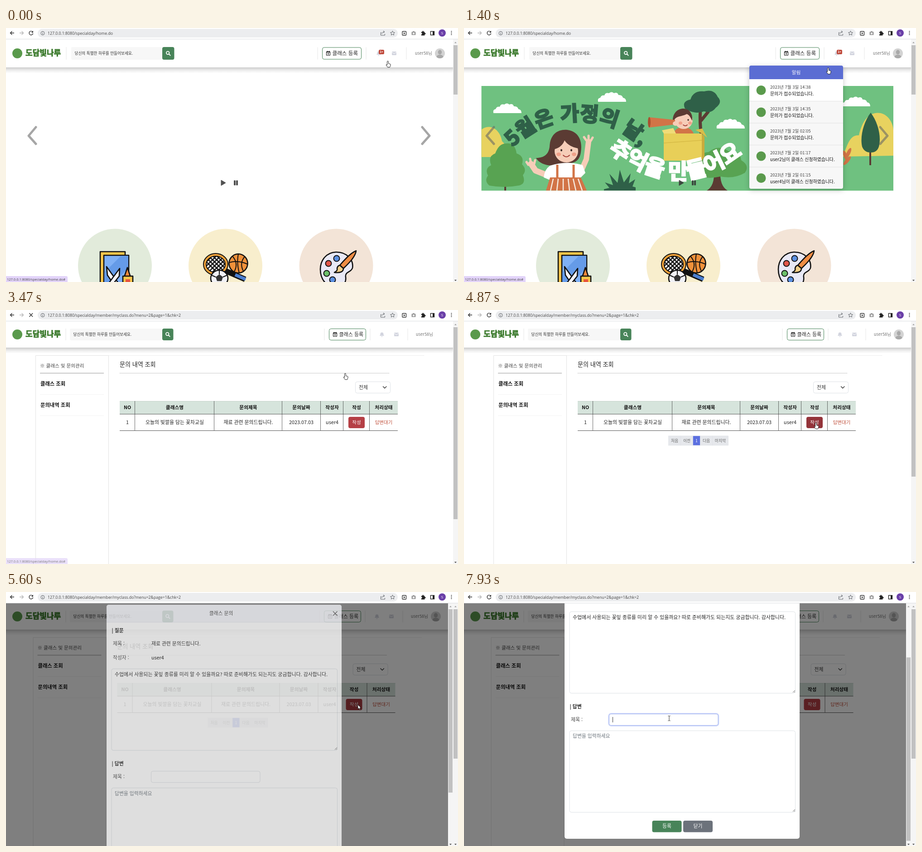
An HTML page for the animation above (8 s loop, 998x561 px).

```html
<!DOCTYPE html>
<html lang="ko">
<head>
<meta charset="utf-8">
<title>문의 답변</title>
<style>
html, body { margin: 0; width: 100%; height: 100%; overflow: hidden; background: #fff; }
svg { display: block; width: 998px; height: 561px; }
text { font-family: "Noto Sans CJK KR", "Noto Sans CJK", "Noto Sans", sans-serif; white-space: pre; }
.ui { font-family: "Open Sans", "Noto Sans", sans-serif; }
.b { font-weight: 700; }
.m { font-weight: 500; }
.x { font-weight: 900; }
.c { text-anchor: middle; }
#drop { filter: drop-shadow(0 3px 6px rgba(0, 0, 0, .22)); }
</style>
</head>
<body>
<svg id="stage" viewBox="0 0 998 561" xmlns="http://www.w3.org/2000/svg"></svg>
<script>
const LOOP = 8000;
const GREEN = '#488459', RED = '#b53f45', LINE = '#dee2e6';

// Drawing helpers; text is placed by its vertical centre
const R = (x, y, w, h, fill, more = '') => `<rect x="${x}" y="${y}" width="${w}" height="${h}" fill="${fill}" ${more}/>`;
const E = (x, y, rx, ry, fill, more = '') => `<ellipse cx="${x}" cy="${y}" rx="${rx}" ry="${ry}" fill="${fill}" ${more}/>`;
const P = (d, fill, more = '') => `<path d="${d}" fill="${fill}" ${more}/>`;
const S = (d, stroke, w = 1, more = '') => `<path d="${d}" fill="none" stroke="${stroke}" stroke-width="${w}" ${more}/>`;
const T = (x, y, size, str, fill = '#222', cls = '', more = '') =>
  `<text x="${x}" y="${y + size * .37}" font-size="${size}" fill="${fill}" class="${cls}" ${more}>${str}</text>`;
const G = (id, body, more = '') => `<g id="${id}" ${more}>${body}</g>`;
const at = (x, y, body) => `<g transform="translate(${x} ${y})">${body}</g>`;
const each = (list, fn) => list.map(fn).join('');
const box = 'rx="4" stroke="' + LINE + '"';
const ink = 'stroke="#111" stroke-width="2.6" stroke-linejoin="round"';
const round = 'stroke-linecap="round" stroke-linejoin="round"';

const avatar = (x, y) => E(x, y, 11, 11, '#d3d3d3') + E(x, y - 2.5, 4.2, 5, '#a9a9a9') +
  P(`M${x - 7.5} ${y + 8}q1-5 7.5-5t7.5 5q-3 3-7.5 3t-7.5-3z`, '#a9a9a9');

function headerLeft(y, h, x, sep) {
  const top = y - h / 2, bw = h - 1.5;
  return E(25, y, 11, 11, '#5a9a4c') +
    T(43, y - 1, 17, '도담빛나루', '#3b7a2c', 'x', 'stroke="#3b7a2c" stroke-width=".8"') +
    S(`M${sep} ${top}v${h}`, '#e6e6e6') + R(x, top, 345 - x, h, '#f7f7f7', 'rx="3"') +
    T(x + 7.5, y, 8.65, '당신의 특별한 하루를 만들어보세요.', '#333') +
    R(345, top, bw, h, GREEN, 'rx="4"') +
    S(`M${345 + bw / 2 + 1.5} ${y + 1.5}l3 3`, '#fff', 1.8, round) +
    E(345 + bw / 2 - 1, y - 1, 3.3, 3.3, 'none', 'stroke="#fff" stroke-width="1.7"');
}

function headerRight(y, h, o) {
  const top = y - h / 2;
  return S(each(o.lines, x => `M${x} ${top}v${h}`), '#e6e6e6') +
    R(o.btn + .5, top + .5, o.w - 1, h - 1, '#fff', `rx="4" stroke="${GREEN}"`) +
    at(o.btn + 13.5, y, R(-4, -3.5, 8, 8, 'none', 'rx="1" stroke="#222" stroke-width="1.2"') +
      S('M-4-3h8M-2-5.5v2M2-5.5v2', '#222', 1.8) + S('M0-1v4M-2 1h4', '#222', 1.1)) +
    T(o.btn + 22.5, y, o.size, '클래스 등록', '#222') +
    at(o.bell, y, P('M-5 3q1.6-1.6 1.6-4.2a3.4 3.4 0 0 1 6.8 0q0 2.6 1.6 4.2zM-1.5 4h3a1.5 1.5 0 0 1-3 0z', '#d3d5df')) +
    at(o.mail, y, R(-5, -4, 10, 8, '#d3d5df', 'rx="1.2"') + S('M-5-2.5l5 3.2 5-3.2', '#fff', 1)) +
    T(o.name, y, 9.4, 'user58님', '#777');
}

const shadow = (id, y, w) => R(0, y, w, 13, 'url(#shade)', `id="${id}"`);

// Banner
const cloud = (x, y) => at(x, y, P('M-31 11q-2-8 5-9 2-6 9-5 2-7 10-5 6-5 11 0 8-3 10 4 8-1 10 6 7 1 7 9z', '#fff'));
const DARK = '#2f6048', LEAF = '#58a352', BROWN = '#5b3b33', SKIN = '#f6cdb8', ORANGE = '#d27447', YELLOW = '#e8d25f';

const scenery =
  P('M38 225C52 212 78 218 84 250C95 262 108 272 115 285H38z', YELLOW) +
  P('M836 284C848 255 852 236 872 237C880 200 898 184 920 188C938 192 948 212 948 226V282z', YELLOW) +
  cloud(96, 177) + cloud(327, 152) + cloud(589, 211) + cloud(866, 162) +
  S('M91 320V359', BROWN, 4) +
  P('M56 348q-12-10-3-22-8-16 7-23-8-20 9-26 8-22 24-22 20-2 23 22 18 6 12 24 12 12 2 24 8 20-10 23-30 6-64 0z', LEAF) +
  S('M897 200V303', BROWN, 4) + P('M898 187C914 208 922 240 916 262Q912 275 898 275Q884 275 879 262C874 240 882 208 898 187z', DARK) +
  each([[842, 282, -20], [849, 276, 25], [846, 293, 40]], ([x, y, a]) =>
    E(x, y, 4, 12, ORANGE, `transform="rotate(${a} ${x} ${y})"`)) +
  P('M536 359q18-10 16-45h14q-2 35 16 45z', BROWN) +
  P('M508 322q-10-16 8-24 0-22 24-24 22-18 44-2 26-2 28 20 20 12 8 28-24 14-54 8-34 8-58-6z', LEAF) +
  P('M309 356l12-3-10-12 18 6-8-25 18 20 5-29 9 28 15-20-4 22 14-9-6 16 7 2v7H309z', DARK);

const girl =
  S('M188 327L158 315 148 300', SKIN, 13, round) + S('M256 322L270 290 275 251', SKIN, 12, round) +
  S('M142 302l-4-6M148 298l-2-9M155 300l2-8M270 248l-5-7M275 246v-8M280 249l4-7', SKIN, 5, round) +
  P('M189 262C190 236 206 223 228 225C252 228 262 248 258 274C256 290 248 296 238 298L204 303C186 306 166 300 159 287C178 287 187 278 189 262z', BROWN) +
  P('M190 304Q228 292 262 303L268 320 256 332V359H190V336L176 330Q178 312 190 304z', '#fff') +
  P('M190 330H258L271 359H181z', ORANGE) +
  S(each([0, 1, 2, 3, 4, 5], i => `M${197 + i * 11} 333L${191 + i * 14} 359`), '#f7ebe0', 2.5) +
  S('M206 302V332M242 302V332', ORANGE, 5) +
  E(226, 272, 26, 25, SKIN) + P('M198 268C204 238 246 234 253 266C240 264 228 258 222 248C218 260 208 266 198 268z', BROWN) +
  E(209, 279, 5, 4, '#f0a088') + E(243, 279, 5, 4, '#f0a088') +
  E(215, 270, 2, 2.4, '#3a2a26') + E(237, 270, 2, 2.4, '#3a2a26') + S('M219 281q7 7 14 0', '#a8443c', 2, round);

const boy =
  S('M524 236Q520 210 522 178M523 205L540 184', BROWN, 7) +
  P('M488 178q-8-16 12-20 6-20 30-18 22-6 30 12 12 12-4 24-10 14-26 8-20 8-42-6z', DARK) +
  P('M462 236q2-16 22-17 20 1 24 17z', ORANGE) + E(485, 203, 20, 20, SKIN) +
  P('M461 205C460 170 508 168 504 205C500 198 498 192 492 190C480 196 468 194 464 204z', BROWN) +
  E(478, 210, 4, 3.5, '#f0a088') + E(499, 210, 4, 3.5, '#f0a088') +
  E(495, 203, 1.6, 2, '#3a2a26') + S('M484 214q5 4 9 0', '#a8443c', 1.8, round) +
  P('M408 197L466 203V213L408 220z', ORANGE) + E(409, 208, 3, 11.5, '#a9512f') + E(467, 211, 6, 5, SKIN) +
  P('M441 233H525V293H441z', '#e8cf58') + P('M525 233L531 240V284L525 293z', '#c9ab3c') +
  P('M441 233L437 226 462 221 468 233z', '#f0dc78') + P('M525 233L511 225 526 222 537 242z', '#d9bd48') +
  S('M441 254L525 248', '#d6ba45', 1.5);

const slogan = (id, size, fill, str) =>
  `<text font-size="${size}" fill="${fill}" stroke="${fill}" stroke-width="3" class="x"><textPath href="#${id}">${str}</textPath></text>`;

const banner = G('banner', R(38, 128, 910, 231.5, '#6fc180') + scenery + girl + boy +
  slogan('arcUp', 45, DARK, '5월은 가정의 날,') + slogan('arcDown', 48.5, '#fff', '추억을 만들어요'), 'clip-path="url(#bannerClip)"');

const controls = S('M66 219L50 238 66 256M919 219L935 238 919 256', '#666', 5, round + ' opacity=".58"') +
  P('M475 336l10 6-10 6zM503.5 337h3v10h-3zM508.5 337h3v10h-3z', '#333', 'opacity=".85" stroke="#333" stroke-linejoin="round"');

const craft = R(208, 494, 55, 80, '#f7c64b', ink) + R(216, 502, 55, 80, '#7fb0f5', ink) +
  P('M217 540L254 503H270V530L240 561H217z', '#659be8') +
  P('M222 527L250 566H238L224 546z', '#f4f4fa', ink) + P('M251 531L225 566H236L250 548z', '#f4f4fa', ink) +
  P('M268 529l-7 21h14z', '#f58a3c', ink) + R(258, 548, 22, 20, '#f7c64b', ink) + R(264, 555, 10, 10, '#e8553e');

const sports = S('M484 536L528 555', '#111', 12) + S('M506 545L529 555', '#4a7fd0', 7) +
  E(463, 522, 24, 21, '#fff', ink) +
  `<g clip-path="url(#racket)">${S(each([0, 1, 2, 3, 4, 5, 6], i =>
    `M${426 + i * 9} 500l50 50M${450 + i * 9} 500l-50 50`), '#111', 2.6)}</g>` +
  E(463, 522, 24, 21, 'none', 'stroke="#111" stroke-width="8"') + E(463, 522, 24, 21, 'none', 'stroke="#f2a23a" stroke-width="4"') +
  E(513, 520, 20.5, 21, '#f0913a', ink) + S('M493 518q20-6 41 4M513 499q-4 20 2 42M500 504q14 16 4 34M527 505q-12 14-3 32', '#111', 2) +
  E(471, 553, 19, 18, '#f1f1f6', ink) + P('M471 544l8 6-3 9h-10l-3-9z', '#333') +
  S('M471 544v-9M479 550l9-4M463 550l-9-4', '#111', 2);

const paint = P('M728 495C752 494 768 512 765 530C762 540 748 538 750 550C752 566 740 572 728 572C708 572 694 556 694 533C694 512 708 496 728 495z', '#e9e9f6', ink) +
  each([[712, 520, '#e0574a'], [730, 509, '#5b8fe0'], [708, 542, '#6cbf6a'], [721, 556, '#5b8fe0']], ([x, y, c]) =>
    E(x, y, 6.5, 6.5, c, 'stroke="#111" stroke-width="2"')) +
  P('M773 492Q772 506 745 531L737 524Q760 497 773 492z', '#ef8d45', ink) +
  P('M737 524l8 7q0 11-20 9 8-4 6-9 1-6 6-7z', '#f4cf8a', ink);

const home = G('home', banner + controls +
  each([[240.5, '#e2ebdb'], [484.5, '#f8eecd'], [729, '#f3e4d7']], ([x, c]) => E(x, 525, 81.5, 81.5, c)) +
  craft + sports + paint + shadow('', 87, 987) + headerLeft(56, 28, 144, 133) +
  headerRight(56, 27, { lines: [688, 795, 884], btn: 698, w: 87, size: 11.6, bell: 823, mail: 857, name: 903 }) +
  avatar(958, 56) + R(823, 48, 12, 10, '#c04a3c', 'rx="2.5"') + T(829, 53, 6.5, '1+', '#fff', 'b c'));

const notes = [
  ['7월 3일 14:38', '문의가 접수되었습니다.'], ['7월 3일 14:35', '문의가 접수되었습니다.'],
  ['7월 2일 02:05', '문의가 접수되었습니다.'], ['7월 2일 01:17', 'user2님이 클래스 신청하였습니다.'],
  ['7월 2일 01:15', 'user4님이 클래스 신청하였습니다.']];
const drop = G('drop', R(630, 83, 207, 272, '#f7f7f7', 'rx="4"') + R(630, 113, 207, 48.5, '#fff') +
  P('M630 113V87q0-4 4-4H833q4 0 4 4V113z', '#5b6dd3') + T(733.5, 98, 10.6, '알림', '#fff', 'c') +
  each(notes, ([when, what], i) => at(0, i * 48.5, (i ? S('M630 113h207', '#e2e2e2') : '') +
    E(656, 137.5, 10.5, 10.5, '#5a9a4c') + T(676, 130, 9.5, '2023년 ' + when, '#444') + T(676, 145, 9.9, what, '#111', 'm'))));

// Inquiry list
const cols = [[268, 'NO', '1'], [372.5, '클래스명', '오늘의 빛깔을 담는 꽃차교실'], [535, '문의제목', '재료 관련 문의드립니다.'],
  [652, '문의날짜', '2023.07.03'], [720, '작성자', 'user4'], [774, '작성', ''], [834, '처리상태', '']];
const pages = [[451.5, 27, '처음'], [478.5, 27, '이전'], [505.5, 16, '1'], [521.5, 27, '다음'], [548.5, 35, '마지막']];

const list = S('M65.5 561V100.5H226.5V561', '#e3e3e3') + S('M226 100.5H923', '#ddd', 1, 'stroke-dasharray="1 1"') +
  T(75, 123, 10.6, '※ 클래스 및 문의관리', '#444') + S('M75 139.5H216', '#b5b5b5', 1.5) +
  T(76, 163, 11.3, '클래스 조회', '#111', 'b') + T(76, 210, 11.3, '문의내역 조회', '#111', 'b') +
  S('M75 186.5H216M75 233.5H216', '#f3f3f3') +
  T(251, 120, 13.1, '문의 내역 조회', '#222', 'm') + S('M251 139.5H847', '#999', 1, 'stroke-dasharray="1 1"') +
  R(771.5, 158.5, 77, 25, '#fff', box) + T(779, 171, 10.8, '전체', '#333') + S('M832.5 169l3.7 3.7 3.7-3.7', '#333', 1.4, round) +
  R(251, 201, 614, 29, '#d6e4dc') + S('M251 201.5H865', '#c5d3cb') + S('M251 230H865M251 266.5H865', '#555') +
  S(each([285, 460, 610, 695, 745, 803], x => `M${x - .5} 201V266`), '#444', .8) +
  each(cols, ([x, head, cell]) => T(x, 215.5, 10.7, head, '#111', 'b c') + T(x, 248, 10.85, cell, '#222', 'c')) +
  R(756, 236, 36, 25, RED, 'rx="4" id="write"') + T(774, 248.5, 10.6, '작성', '#fff', 'c') + T(834, 248, 10.5, '답변대기', '#c0503c', 'c') +
  G('pager', each(pages, ([x, w, s]) => {
    const on = s === '1';
    return R(x, 278, w, 21, on ? '#5b6fe0' : '#e6e8ec', 'stroke="#dcdfe4" stroke-width=".6"') + T(x + w / 2, 288.5, 8.8, s, on ? '#fff' : '#666', 'c');
  }));

const mine = G('mine', G('list', list) + shadow('mineShade', 83, 987) + headerLeft(54, 26, 141, 132) +
  G('mineRight', headerRight(54, 26, { lines: [703, 804, 887], btn: 713, w: 82, size: 11, bell: 830, mail: 862, name: 905 }) +
    G('face', avatar(960, 54))));

// Reply dialog
const grip = y => S(`M726 ${y}l5-5M729 ${y}l2-2`, '#555', .9);
const area = y => R(233, y + .5, 498.5, 180, '#fff', box) + grip(y + 179);
const button = (x, w, fill, s) => R(x, 647, w, 25.5, fill, 'rx="4"') + T(x + w / 2, 659.5, 10.8, s, '#fff', 'c');
const modal = G('modal', R(222, 44, 519, 643, '#fff', 'rx="5"') +
  P('M222 82V49q0-5 5-5H736q5 0 5 5V82z', '#f5f6fb') + S('M222 82.5H741', '#e4e6ee') +
  T(475, 63, 10.8, '클래스 문의', '#444', 'c') + S('M722 58.5l9.5 9.5M731.5 58.5l-9.5 9.5', '#555', 1.3) +
  T(233.5, 101, 10.8, '| 질문', '#222', 'b') + T(236, 130, 10.8, '제목 :', '#444') + T(321, 130, 10.8, '재료 관련 문의드립니다.') +
  T(236, 161, 10.8, '작성자 :', '#444') + T(321, 161, 10.8, 'user4', '#111') +
  area(185) + T(240, 198, 10.93, '수업에서 사용되는 꽃잎 종류를 미리 알 수 있을까요? 따로 준비해가도 되는지도 궁금합니다. 감사합니다.') +
  T(233.5, 395, 10.8, '| 답변', '#222', 'b') + T(236, 424, 10.8, '제목 :', '#444') + R(320.5, 411.5, 240.5, 25, '#fff', box) +
  G('focus', R(319.8, 410.8, 242, 26.4, '#fff', 'rx="5" stroke="#ccd6fb" stroke-width="3"') +
    R(320.5, 411.5, 240.5, 25, '#fff', 'rx="4" stroke="#a5b5ee"') + S('M328.5 418V430', '#222', .9)) +
  area(448) + T(240, 460.5, 10.8, '답변을 입력하세요', '#6c757d') +
  button(415.5, 65, GREEN, '등록') + button(484, 65, '#6c727b', '닫기'));

const scrollbar = (id, x) => G(id, R(x, 25, 11, 536, '#f5f5f5') + R(x + 1, 38, 9, 100, '#c1c1c1', `id="${id}Thumb"`) +
  P(`M${x + 3} 33.5h5l-2.5-3z`, '#a0a0a0') + P(`M${x + 3} 556h5l-2.5 3z`, '#505050'));

// Browser toolbar
const url = '127.0.0.1:8080/specialday/';
const dark = '#444', gray = '#5f6368';
const toolbar = R(0, 0, 998, 25, '#fff') + S('M0 24.5H998', '#dcdee1') + R(70, 2, 795, 19, '#ecedef', 'rx="9.5"') +
  S('M18 11H10M13.5 7L9.5 11l4 4', '#333', 1.4) + S('M30 11h8M34.5 7l4 4-4 4', '#b5b5b5', 1.3) +
  G('reload', S('M58.7 8.4A4.3 4.3 0 1 0 59.6 12', '#333', 1.4) + P('M60 6v4.2h-4.2z', '#333')) +
  G('stop', S('M51.5 7l7.5 8M59 7l-7.5 8', '#333', 1.4)) +
  E(81, 11.5, 4, 4, 'none', `stroke="${gray}"`) + S('M81 11v3M81 8.8v1', gray, 1.1) +
  T(92, 11.5, 8.7, url + 'home.do', dark, 'ui', 'id="urlHome"') +
  T(92, 11.5, 8.7, url + 'member/myclass.do?menu=2&amp;page=1&amp;chk=2', dark, 'ui', 'id="urlMine"') +
  S('M829 10h-1.5v6h9v-3M830 13q0-4 5-4.5M833 6l3 2.5-3 2.5', gray, 1) +
  P('M853.5 6.5l1.4 3.2 3.5.3-2.6 2.3.8 3.4-3.1-1.8-3.1 1.8.8-3.4-2.6-2.3 3.5-.3z', 'none', `stroke="${gray}"`) +
  R(875, 7.5, 8.5, 8.5, 'none', 'rx="1" stroke="#333" stroke-width="1.4"') + P('M878 9.5l3.6 2.3-3.6 2.3z', '#333') +
  P('M895.5 8.5h2l1-1.5h3l1 1.5h2v7h-9z', '#9a9a9a') + E(900, 12, 2, 2, '#fff') +
  P('M917 8.5h2.3q-.3-2.3 1.4-2.3t1.4 2.3h2.4v2.6q2.2-.2 2.2 1.4t-2.2 1.4V16.5h-7.5v-2.6q1.8 0 1.8-1.4t-1.8-1.4z', '#222') +
  R(937.5, 7.5, 8, 8, 'none', 'stroke="#222" stroke-width="1.4"') + R(942, 7, 4, 9, '#222') +
  E(963, 11, 8, 8, '#6a3fa8') + T(963, 11, 8, 'S', '#fff', 'ui c') + each([7.5, 11, 14.5], y => E(983.5, y, 1.1, 1.1, '#333'));

const status = G('status', P('M0 548H133q3 0 3 3V561H0z', '#e2d3f9') + T(2, 555.5, 7.5, url + 'home.do#', dark, 'ui'));

const edge = 'stroke="#111" stroke-width=".9" stroke-linejoin="round"';
const cursor = G('cursor',
  G('hand', P('M-1.4 1.4a1.4 1.4 0 0 1 2.8 0v4.2l3.4.7q1.4.4 1.3 1.8l-.6 3.2-1 2.4h-4.8l-3.2-4.5q-.7-1.5.8-1.3l1.3 1z', '#fff', edge)) +
  G('arrow', P('M0 0v9.6l2.2-2 1.5 3.5 1.7-.7-1.5-3.5h3z', '#fff', edge)) +
  G('beam', S('M-2.5-5.5q2 0 2.5 1 .5-1 2.5-1M0-4.5v9M-2.5 5.5q2 0 2.5-1 .5 1 2.5 1', '#333', 1)));

const defs = `<defs>
<linearGradient id="shade" x2="0" y2="1"><stop stop-opacity=".2"/><stop offset=".5" stop-opacity=".07"/><stop offset="1" stop-opacity="0"/></linearGradient>
<clipPath id="bannerClip"><rect x="38.5" y="128" width="909.5" height="231.5"/></clipPath>
<clipPath id="racket"><ellipse cx="463" cy="522" rx="24" ry="21"/></clipPath>
<path id="arcUp" d="M108 264C150 220 200 204 250 205S335 212 388 258"/>
<path id="arcDown" d="M318 272Q385 320 440 331Q485 340 531 325Q590 305 650 248"/></defs>`;

const stage = document.getElementById('stage');
stage.innerHTML = defs + R(0, 0, 998, 561, '#fff') + home + drop + mine + R(0, 25, 987, 536, '#000', 'id="dim"') +
  modal + scrollbar('inner', 976) + scrollbar('outer', 987) + status + toolbar + cursor;

const el = {};
stage.querySelectorAll('[id]').forEach(n => el[n.id] = n);

const clamp = p => Math.max(0, Math.min(1, p));
const ramp = (t, a, b) => clamp((t - a) / (b - a));
const smooth = p => p * p * (3 - 2 * p);
const show = (id, on) => el[id].style.display = on ? '' : 'none';
const fade = (id, v) => el[id].style.opacity = v;
const move = (id, x, y) => el[id].setAttribute('transform', `translate(${x} ${y})`);

// Moves of the pointer: start, end, x, y
const moves = [[130, 470, 826, 58], [665, 730, 827, 56], [1335, 1398, 804, 88], [1398, 2130, 749, 140],
  [3480, 4270, 777, 249], [5730, 6530, 414, 406], [7260, 7750, 453, 279]];

function pointer(t) {
  let x = 843, y = 73;
  for (const [a, b, nx, ny] of moves) {
    const p = smooth(ramp(t, a, b));
    x += (nx - x) * p;
    y += (ny - y) * p;
  }
  move('cursor', x, y);
  const shape = t < 3500 ? 'hand' : t < 4465 ? 'arrow' : t < 5325 ? 'hand' : t < 6800 ? 'arrow' : 'beam';
  ['hand', 'arrow', 'beam'].forEach(s => show(s, s === shape));
}

function render(t) {
  const onMine = t >= 3465, loaded = t >= 3535, locked = t >= 5325, open = t >= 5485;
  show('home', !onMine);
  show('mine', onMine);
  show('drop', t >= 1065 && !onMine);
  fade('banner', ramp(t, 125, 470) * (1 - ramp(t, 3040, 3200)));

  const busy = t >= 2130 && t < 3800;
  show('stop', busy);
  show('reload', !busy);
  show('urlHome', t < 3065);
  show('urlMine', t >= 3065);
  fade('status', onMine ? .7 * (1 - ramp(t, 3475, 3560)) : 1 - ramp(t, 1600, 1750) + ramp(t, 2130, 2270));

  show('face', loaded);
  show('pager', loaded);
  el.outerThumb.setAttribute('height', !onMine ? 109 : loaded ? 330 : 424);
  move('mineRight', locked ? -11 : 0, 0);
  move('list', locked ? -5.5 : 0, 0);
  el.mineShade.setAttribute('width', locked ? 976 : 987);
  el.write.setAttribute('fill', t < 4325 || t > 5700 ? RED : t >= 4865 && t < 4930 ? '#94343a' : '#a93b41');

  const scroll = 142 * smooth(ramp(t, 6610, 6870));
  const rise = 33 * Math.pow(1 - ramp(t, 5490, 5790), 1.6);
  fade('dim', .5 * ramp(t, 5330, 5480));
  show('modal', open);
  fade('modal', ramp(t, 5490, 5640));
  move('modal', 0, -rise - scroll);
  fade('focus', ramp(t, 7750, 7900));
  show('inner', open);
  el.innerThumb.setAttribute('y', 38 + scroll * .75);
  el.innerThumb.setAttribute('height', 405);
  pointer(t);
}

function tick() {
  render(performance.now() % LOOP);
  requestAnimationFrame(tick);
}
tick();
</script>
</body>
</html>
```
